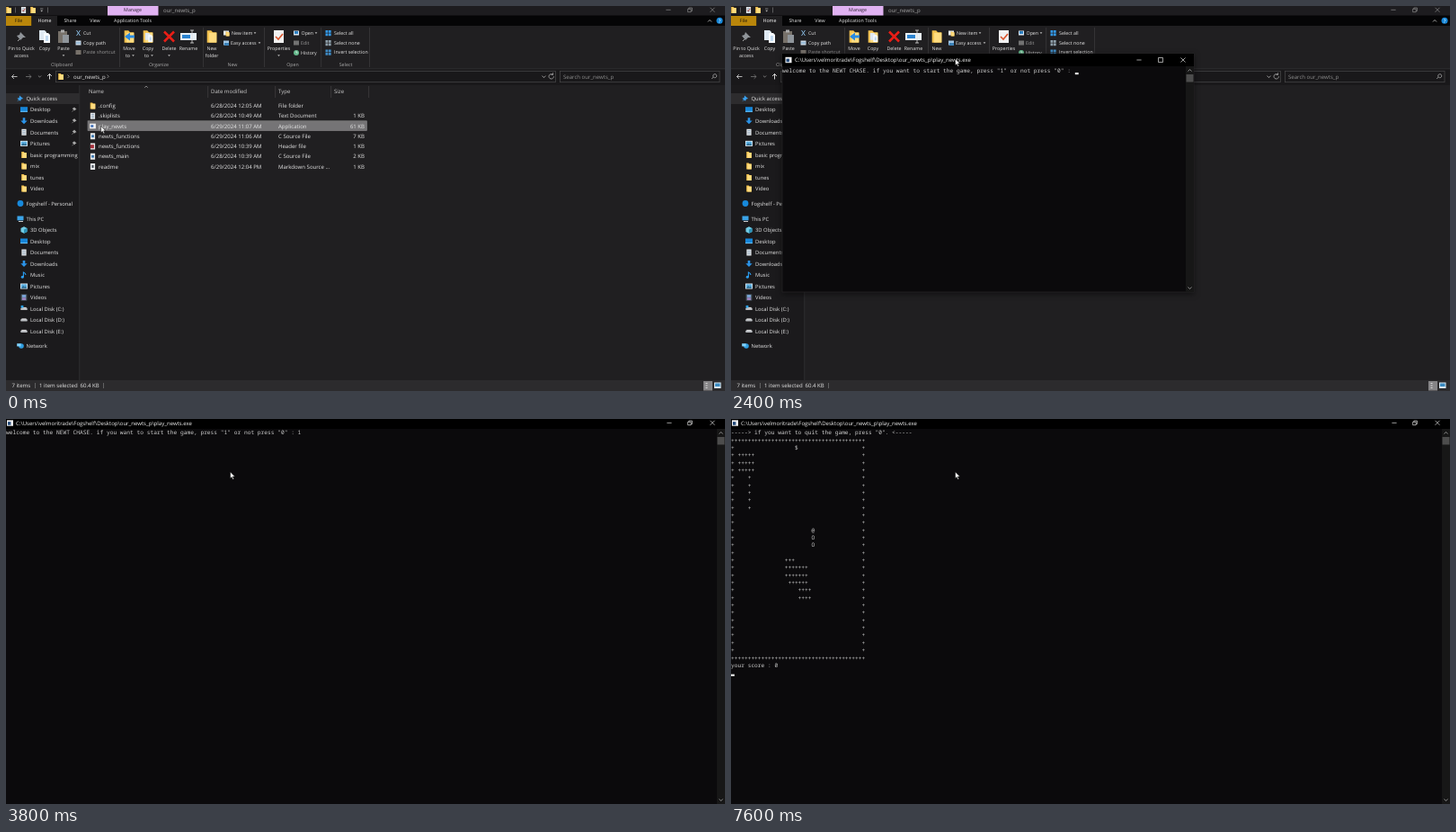
Animation, 800 px wide and 428 px high, one loop 8 s. Source, as an HTML page:

```html
<!DOCTYPE html>
<html lang="en">
<head>
<meta charset="utf-8">
<title>Console game</title>
<style>
html, body { margin: 0; width: 100%; height: 100%; overflow: hidden; background: #000; }
svg { display: block; width: 100vw; height: 100vh; }
text { font: 6.05px "Open Sans", sans-serif; fill: #e6e6e6; white-space: pre; text-rendering: geometricPrecision; }
.ribbon text { font-size: 5.3px; }
.nav text { font-size: 5.85px; }
.mono { font: 6.23px "Noto Sans Mono", monospace; fill: #ccc; }
#small { filter: drop-shadow(0 2px 3px rgba(0, 0, 0, .5)); }
</style>
</head>
<body>
<svg id="stage" viewBox="0 0 800 428"></svg>
<script>
const LOOP = 8000, COL = 3.74, ROW = 8.34;
const FOLDER = 'our_newts_p';
const EXE_PATH = `C:\\Users\\velmoritrade\\Fogshelf\\Desktop\\${FOLDER}\\play_newts.exe`;
const PROMPT = 'welcome to the NEWT CHASE. if you want to start the game, press "1" or not press "0" : ';

// Drawing helpers, each returning SVG markup
const rect = (x, y, w, h, fill, more = '') => `<rect x="${x}" y="${y}" width="${w}" height="${h}" fill="${fill}" ${more}/>`;
const line = (d, stroke = '#ccc', width = .7) => `<path d="${d}" fill="none" stroke="${stroke}" stroke-width="${width}"/>`;
const shape = (d, fill) => `<path d="${d}" fill="${fill}"/>`;
const dot = (x, y, r, fill) => `<circle cx="${x}" cy="${y}" r="${r}" fill="${fill}"/>`;
const text = (x, y, s, fill = '#e6e6e6', anchor = 'start') =>
  `<text x="${x}" y="${y}" style="fill:${fill}" text-anchor="${anchor}">${s}</text>`;
const mid = (x, y, s, fill) => text(x, y, s, fill, 'middle');
const at = (x, y, body, scale = 1) => `<g transform="translate(${x} ${y}) scale(${scale})">${body}</g>`;
const group = (name, body) => `<g class="${name}">${body}</g>`;
const chevron = (x, y, up, color = '#aaa', r = 2) => line(`M${x - r} ${y + (up ? 1 : -1)}l${r} ${up ? -r : r}l${r} ${up ? r : -r}`, color, .8);
const caret = (x, y) => shape(`M${x - 1.4} ${y - .7}h2.8l-1.4 1.6z`, '#bbb');

const page = rect(-2.6, -3.5, 5.2, 7, '#e8eaec');
const drive = rect(-3.8, -1, 7.6, 2.6, '#b9bcc0', 'rx="1.2"') + rect(-2.6, -1.6, 5.2, 1, '#e9e9e9');
const icons = {
  folder: shape('M-2.8 -3.5h2.4l1 1h2.2v6h-5.6z', '#f2c14f') + rect(-1.6, -2.2, 4.4, 5.6, '#ffdc80'),
  pin: shape('M-1 -3.5l4.2 3.5l-2.2 .5l-1 2.3l-1.4 -1.3l-2.2 2l1.6 -2.6l-1.6 -1.2l2.3 -.8z', '#3aa0ee'),
  screen: rect(-4, -3, 8, 5.5, '#1685d8') + rect(-4, 1.6, 8, 1, '#6cc3fa'),
  down: shape('M-1.3 -3.5h2.6v3.2h2.4l-3.7 3.8l-3.7 -3.8h2.4z', '#2b93e8'),
  doc: page + line('M-1.6 -1.8h3.2M-1.6 0h3.2M-1.6 1.8h3.2', '#5d7f9c', .6),
  picture: rect(-4, -3, 8, 6, '#e3eef5') + rect(-3.2, -2.2, 6.4, 4.4, '#5aaee0') + shape('M-3.2 2.2l2.4 -2.6l1.7 1.4l1.2 -1l1.1 2.2z', '#2f6d92'),
  cloud: dot(0, 0, 3.4, '#1789dc'),
  pc: rect(-3.5, -3, 7, 4.8, '#3ba3e8') + line('M-2 3h5', '#ccc', 1),
  cube: shape('M0 -3.8l3.5 1.7v4.2l-3.5 1.7l-3.5 -1.7v-4.2z', '#72cce5') + shape('M0 -.5l3.5 -1.6v4.2l-3.5 1.7z', '#2c91b7'),
  music: line('M-.6 2.2v-5.2q2.4 1 2.6 3', '#2b9ff4', 1.1) + dot(-1.7, 2.2, 1.5, '#2b9ff4'),
  video: rect(-3.3, -3.5, 6.6, 7, '#51606c') + rect(-2, -2.8, 4, 2.6, '#7ba9df') + rect(-2, .3, 4, 2.6, '#a085c4'),
  drive,
  systemDrive: drive + rect(-3.4, -3.6, 2.8, 2.6, '#2aa2ea'),
  network: dot(1, 0, 2.8, '#2f9de0') + rect(-3.8, -2.8, 4.4, 3.2, '#7fd0fa'),
  app: rect(-3.4, -2.8, 6.8, 5.6, '#f1f1f1') + rect(-2.2, -1.2, 3, 2.4, '#3568b5'),
  code: page + rect(-1.4, -1.4, 2.8, 2.8, '#3c79b0'),
  header: page + rect(-2.6, -1.8, 4, 4, '#a5303c'),
  readme: page + rect(-1, -1.6, 2, 3, '#48505a')
};
const icon = (name, x, y, scale = 1) => at(x, y, icons[name], scale);

function controls(min, max, close, y, restored, color = '#ddd') {
  const box = restored
    ? `M${max - 2.4} ${y - 1}h3.6v3.4h-3.6zM${max - 1.2} ${y - 1}v-1.3h3.6v3.5h-1.2`
    : `M${max - 2.5} ${y - 2.5}h5v5h-5z`;
  return line(`M${min - 2.6} ${y}h5.2${box}M${close - 2.5} ${y - 2.5}l5 5m0 -5l-5 5`, color);
}

function scrollbar(x, y, h, w = 9) {
  const c = x + w / 2;
  return rect(x, y, w, h, '#171717') + chevron(c, y + 4.5, true) + chevron(c, y + h - 4.5, false)
    + rect(x + .5, y + 9, w - 1, 8.5, '#4d4d4d');
}

const appIcon = (x, y) => rect(x, y - 3.2, 7, 6.4, '#f4f4f4') + rect(x + 1, y - 1.4, 3.4, 3.6, '#234a7a');

function tabs() {
  return rect(113, 0, 56.5, 10.5, '#e0b2f2') + mid(141, 6.2, 'Manage', '#2b1f30')
    + rect(0, 11, 28.5, 11, '#b9860b') + mid(14, 18.4, 'File', '#20180a')
    + rect(28.5, 11, 28.5, 11, '#201f21') + mid(43, 18.4, 'Home', '#fff')
    + mid(71.5, 18.4, 'Share') + mid(99, 18.4, 'View') + mid(141, 18.4, 'Application Tools');
}

function ribbon() {
  const label = (x, a, b, drop) => mid(x, 49, a) + (b ? mid(drop ? x - 1.5 : x, 56.8, b) : '') + (drop ? caret(x + 4.5, 55) : '');
  const small = (x, y, s, fill) => text(x, y + 1.9, s, fill);
  const sheets = shape('M-6 -7h6l2 2v9h-8z', '#dfe9f2') + shape('M-1 -4h5l2 2v9h-7z', '#f7fbff') + line('M1 0h3M1 2h3M1 4h3', '#6fa8d8', .8);
  const tallFolder = at(0, 0, icons.folder, 1.9);
  const mark = (x, y, fill) => rect(x - 3, y - 2.5, 6, 5, fill);
  const grid = (y, fill) => [0, 3.4].map(dx => [0, 3.4].map(dy => rect(355.5 + dx, y - 3 + dy, 2.8, 2.8, fill)).join('')).join('');
  return rect(0, 22, 800, 48, '#201f21')
    + [126, 219, 287, 350.5, 404].map(x => rect(x, 24, .6, 44, '#434244')).join('')
    + at(17, 34, line('M-4 5l4 -4', '#aaa', 1) + shape('M-1 -5l6 6l-3 0l-3 3l-4 -5l3 -1z', '#8f9499')) + label(17, 'Pin to Quick', 'access')
    + at(43, 34, sheets) + label(43, 'Copy')
    + at(64, 34, rect(-6, -6, 10, 13, '#77716a') + rect(-3, -7.5, 4, 3, '#aaa') + rect(-1, -2, 7, 9, '#8f959b')) + label(64, 'Paste') + caret(64, 55)
    + line('M78.5 27l4 6m0 -6l-4 6', '#8fc4ee', .9) + small(86, 30, 'Cut')
    + mark(80.5, 41, '#c9d8e5') + line('M78 41h5', '#3f81b8') + small(86, 41, 'Copy path')
    + mark(80.5, 51.5, '#77716a') + small(86, 51.5, 'Paste shortcut', '#9a9a9a')
    + mid(62, 66.8, 'Clipboard', '#aaa')
    + at(137, 34, tallFolder + shape('M6 -1.5h-5v-3l-6 4.5l6 4.5v-3h5z', '#2b8be0')) + label(137, 'Move', 'to', true)
    + at(158, 34, tallFolder + at(1, 1, sheets, .7)) + label(158, 'Copy', 'to', true)
    + line('M176 28.5l11 11m0 -11l-11 11', '#e81e16', 2.6) + label(181.5, 'Delete') + caret(181.5, 55)
    + rect(194, 30, 18, 8, '#e8f1f8') + rect(196, 32, 9, 4, '#2b83d0') + line('M207 27v14m-2 -14h4m-4 14h4', '#ddd', .8) + label(203, 'Rename')
    + mid(170, 66.8, 'Organize', '#aaa')
    + at(229, 34, tallFolder) + label(229, 'New', 'folder')
    + mark(245, 30, '#e4ecf2') + icon('folder', 246.5, 31, .7) + small(251, 30, 'New item') + caret(277, 30)
    + mark(245, 41, '#9fc5e4') + rect(243, 41, 5, 3, '#3c82b8') + small(250, 41, 'Easy access') + caret(282, 41)
    + mid(252, 66.8, 'New', '#aaa')
    + rect(298, 27, 11, 14, '#f1f1f1') + line('M300 34l3 3l5 -6', '#d9542c', 1.6) + label(303.5, 'Properties') + caret(303.5, 55)
    + mark(323, 30, '#d9e7f3') + rect(321, 28, 4, 3, '#2f81c2') + small(328.5, 30, 'Open') + caret(345, 30)
    + mark(323, 41, '#727272') + small(328, 41, 'Edit', '#999')
    + dot(323, 52, 3, '#65b98c') + line('M323 50v2h1.5', '#fff', .6) + small(328, 52, 'History')
    + mid(319, 66.8, 'Open', '#aaa')
    + grid(30, '#3398e6') + small(365, 30, 'Select all')
    + grid(41, '#8e9faa') + small(365, 41, 'Select none')
    + grid(51.5, '#3f8bc5') + small(365, 51.5, 'Invert selection')
    + mid(378, 66.8, 'Select', '#aaa');
}

function navPane() {
  const item = (name, y, label, top) => icon(name, top ? 16 : 20, y) + text(top ? 22.5 : 27, y + 2.2, label);
  const list = (y, step, entries) => entries.map(([name, label], i) => item(name, y + i * step, label)).join('');
  const pins = [115, 127.7, 140.2, 152.8].map(y => at(76, y, shape('M0 -2.6l2.6 2.6l-1.4 .2l-1 1.4l-2.5 -2.5l1.5 -.8z', '#aaa') + line('M-.8 .8l-1.7 1.7', '#aaa', .6))).join('');
  return rect(0, 88, 81.5, 328, '#1b1a1c') + rect(0, 97, 81.5, 12, '#2d2c2e')
    + item('pin', 103, 'Quick access', true) + pins
    + list(115.2, 12.55, [['screen', 'Desktop'], ['down', 'Downloads'], ['doc', 'Documents'], ['picture', 'Pictures'],
      ['folder', 'basic programming'], ['folder', 'mix'], ['folder', 'tunes'], ['folder', 'Video']])
    + item('cloud', 219.5, 'Fogshelf - Personal', true)
    + item('pc', 236.5, 'This PC', true)
    + list(249, 12.5, [['cube', '3D Objects'], ['screen', 'Desktop'], ['doc', 'Documents'], ['down', 'Downloads'], ['music', 'Music'],
      ['picture', 'Pictures'], ['video', 'Videos'], ['systemDrive', 'Local Disk (C:)'], ['drive', 'Local Disk (D:)'], ['drive', 'Local Disk (E:)']])
    + item('network', 378, 'Network', true);
}

function fileList() {
  const files = [
    ['folder', '.config', '6/28/2024 12:05 AM', 'File folder', ''],
    ['doc', '.skiplists', '6/28/2024 10:49 AM', 'Text Document', '1 KB'],
    ['app', 'play_newts', '6/29/2024 11:07 AM', 'Application', '61 KB'],
    ['code', 'newts_functions', '6/29/2024 11:06 AM', 'C Source File', '7 KB'],
    ['header', 'newts_functions', '6/29/2024 10:39 AM', 'Header file', '1 KB'],
    ['code', 'newts_main', '6/28/2024 10:39 AM', 'C Source File', '2 KB'],
    ['readme', 'readme', '6/29/2024 12:04 PM', 'Markdown Source ...', '1 KB']
  ];
  return [[92, 'Name'], [228, 'Date modified'], [303, 'Type'], [365, 'Size']].map(([x, s]) => text(x, 97.3, s, '#ccc')).join('')
    + [224.5, 299.5, 361.5, 403.5].map(x => rect(x, 89, .6, 13, '#4a494b')).join('')
    + chevron(156, 89.8, true, '#999', 1.8)
    + rect(91, 127.8, 310.5, 10.8, '#757476', 'stroke="#868587" stroke-width=".6"')
    + files.map(([kind, name, date, type, size], i) => {
      const y = 111 + i * 11.25;
      return icon(kind, 96.5, y) + text(103, y + 2.2, name) + text(228, y + 2.2, date) + text(303, y + 2.2, type) + text(399, y + 2.2, size, '#e6e6e6', 'end');
    }).join('');
}

function explorer() {
  return rect(0, 0, 800, 428, '#201f21')
    + rect(0, 0, 800, 10.5, '#1d1c1f') + rect(0, 10.5, 800, 11.5, '#050506')
    + icon('folder', 3, 4.5) + rect(10, 1.5, .6, 6, '#888') + icon('doc', 19.5, 4.5) + line('M18 4.5l1.3 1.4l2 -3', '#c03a2b', .8)
    + icon('folder', 30, 4.5) + line('M38 3h3.4', '#bbb', .6) + caret(39.7, 5.5) + rect(46, 1.5, .6, 6, '#888')
    + text(175, 6.6, FOLDER, '#a3a3a3') + controls(737, 761, 786, 4.3, true, '#8b8b8b')
    + group('ribbon', tabs() + ribbon())
    + chevron(783, 16.5, true, '#ccc') + dot(794, 16.3, 3.5, '#1787d8') + mid(794, 18.5, '?', '#fff')
    + rect(0, 70, 800, 18, '#19181a') + rect(0, 69.6, 800, .6, '#39383a')
    + line('M12.5 78.5h-6m2.4 -2.4l-2.4 2.4l2.4 2.4', '#ddd', .8) + line('M22 78.5h6m-2.4 -2.4l2.4 2.4l-2.4 2.4', '#777', .8)
    + chevron(37.5, 78.5, false, '#999', 1.6) + line('M48.5 81.5v-6m-2.4 2.4l2.4 -2.4l2.4 2.4', '#eee', .9)
    + rect(55.5, 72.3, 556, 12.4, '#19181a', 'stroke="#4b4a4c" stroke-width=".7"')
    + icon('folder', 61, 78.4) + line('M68.5 76.5l1.8 1.8l-1.8 1.8M112.5 76.5l1.8 1.8l-1.8 1.8', '#aaa', .7) + text(75, 80.6, FOLDER)
    + chevron(598.5, 78.6, false, '#bbb') + line('M608.6 76.4a2.7 2.7 0 1 0 .8 1.8m-.8 -4v2.2h-2.2', '#bbb', .7)
    + rect(616.5, 72.3, 177.5, 12.4, '#19181a', 'stroke="#4b4a4c" stroke-width=".7"') + text(620, 80.6, 'Search ' + FOLDER, '#8d8d8d')
    + line('M785.2 81l2 -2m0 0a2 2 0 1 1 .2 .2', '#aaa', .8)
    + group('nav', navPane()) + rect(81.5, 88, .7, 328, '#353436') + fileList()
    + rect(0, 416, 800, 12, '#2c2b2d')
    + text(6.5, 424.2, '7 items') + rect(32, 419, .6, 6, '#888') + text(37, 424.2, '1 item selected') + text(82.5, 424.2, '60.4 KB') + rect(108, 419, .6, 6, '#888')
    + rect(776, 417, 10, 10.5, '#858486') + line('M778.5 419.5h2m-2 2.5h2m-2 2.5h2', '#eee', .8)
    + rect(788, 418.5, 7.5, 6.5, '#d9e9f3') + rect(789, 419.5, 5.5, 3.5, '#3a8ac0');
}

const caretBlock = (x, y) => rect(x, y, 3.9, 2.2, '#e8e8e8');

const smallConsole = rect(57, 53, 458, 265, '#0b0a0c', 'stroke="#2c2b2d" stroke-width=".6"')
  + rect(57, 53, 458, 14, '#000') + appIcon(60.5, 60) + text(71, 62.3, EXE_PATH, '#f2f2f2') + controls(454, 478, 503, 60, false)
  + scrollbar(506, 67, 251) + `<text class="mono" x="57" y="74.4">${PROMPT}</text>` + caretBlock(382.8, 74);

const growingConsole = rect(31, 16, 761, 408, '#000')
  + appIcon(32, 21.3) + text(42, 23.6, EXE_PATH, '#f2f2f2') + controls(732, 755, 779, 21.3, true)
  + scrollbar(783, 27, 397) + caretBlock(341, 33)
  + rect(82, 67, 443, 256, '#fff') + rect(85.5, 82, 435.5, 237.5, '#0b0a0c') + scrollbar(513, 82, 237.5, 8)
  + `<text class="mono" x="85.5" y="88.2" style="font-size:5.93px">${PROMPT}</text>` + caretBlock(395, 88);

const fullConsole = rect(0, 0, 800, 428, '#0b0a0c') + rect(0, 0, 800, 11, '#000')
  + appIcon(1, 4.5) + text(11, 6.8, EXE_PATH, '#f2f2f2') + controls(738, 761, 786, 4.3, true)
  + scrollbar(791, 11, 417)
  + Array.from({ length: 33 }, (_, r) => `<text class="mono line" x="0" y="${17.3 + r * ROW}"></text>`).join('')
  + `<g id="block">${caretBlock(0, 0)}</g>`;

const stage = document.getElementById('stage');
stage.innerHTML = explorer()
  + `<g id="small">${smallConsole}</g><g id="growing">${growingConsole}</g><g id="full">${fullConsole}</g>`
  + `<path id="mouse" d="M0 0v7.2l1.7 -1.5l1.2 2.7l1.2 -.5l-1.2 -2.6h2.3z" fill="#fff" stroke="#000" stroke-width=".5"/>`;
const [small, growing, full, block, mouse] = ['small', 'growing', 'full', 'block', 'mouse'].map(id => document.getElementById(id));
const lines = [...stage.querySelectorAll('.line')];

// Walls as [first row, row count, column, length]
const WALLS = [[1, 1, 0, 40], [30, 1, 0, 40], [2, 28, 0, 1], [2, 28, 39, 1], [3, 3, 2, 5], [6, 5, 5, 1],
  [17, 1, 16, 3], [18, 2, 16, 7], [20, 1, 17, 6], [21, 2, 20, 4]];
const snakeCell = n => n < 6 ? [15, 19 + n] : [20 - n, 24];

function gameRows(t) {
  const board = Array.from({ length: 31 }, () => Array(40).fill(' '));
  for (const [row, count, col, length] of WALLS)
    for (let r = row; r < row + count; r++) board[r].fill('+', col, col + length);
  board[2][19] = '$';
  const n = Math.max(0, Math.floor((t - 4800) / 400));
  [2, 1, 0].forEach(back => {
    const [r, c] = snakeCell(n - back);
    board[r][c] = back ? 'O' : '@';
  });
  const rows = board.map(cells => cells.join(''));
  rows[0] = '-----> if you want to quit the game, press "0". <-----';
  return [...rows, 'your score : 0'];
}

function consoleState(t) {
  if (t < 3400) return { rows: [PROMPT], cursor: [0, 87] };
  if (t < 4000) return { rows: [PROMPT + (t < 3600 ? '' : '1')] };
  if (t < 4600) return { rows: [], cursor: [4, 0] };
  return { rows: gameRows(t), cursor: [32, 0] };
}

const lastStep = (steps, t) => steps.findLast(([start]) => start <= t);
const FADE = [[0, 0], [600, .85], [800, .97], [1000, 1], [2600, 0]];
const MOUSE = [[0, 105.7, 133.5], [1600, 118, 127], [1800, 160, 105], [2000, 206, 81], [2200, 238, 65], [2400, 249.5, 58.8]];

function render(t) {
  small.setAttribute('opacity', lastStep(FADE, t)[1]);
  growing.style.display = t >= 2600 && t < 2800 ? '' : 'none';
  full.style.display = t >= 2800 ? '' : 'none';
  const [, x, y] = lastStep(MOUSE, t);
  mouse.setAttribute('transform', `translate(${x} ${y})`);
  const { rows, cursor } = consoleState(t);
  lines.forEach((el, r) => { el.textContent = rows[r] || ''; });
  block.style.display = cursor ? '' : 'none';
  if (cursor) block.setAttribute('transform', `translate(${cursor[1] * COL} ${16.8 + cursor[0] * ROW})`);
}

const start = performance.now();
let shown = -1;
function frame() {
  const t = Math.floor(((performance.now() - start) % LOOP) / 200) * 200;
  if (t !== shown) render(shown = t);
  requestAnimationFrame(frame);
}
frame();
</script>
</body>
</html>
```
